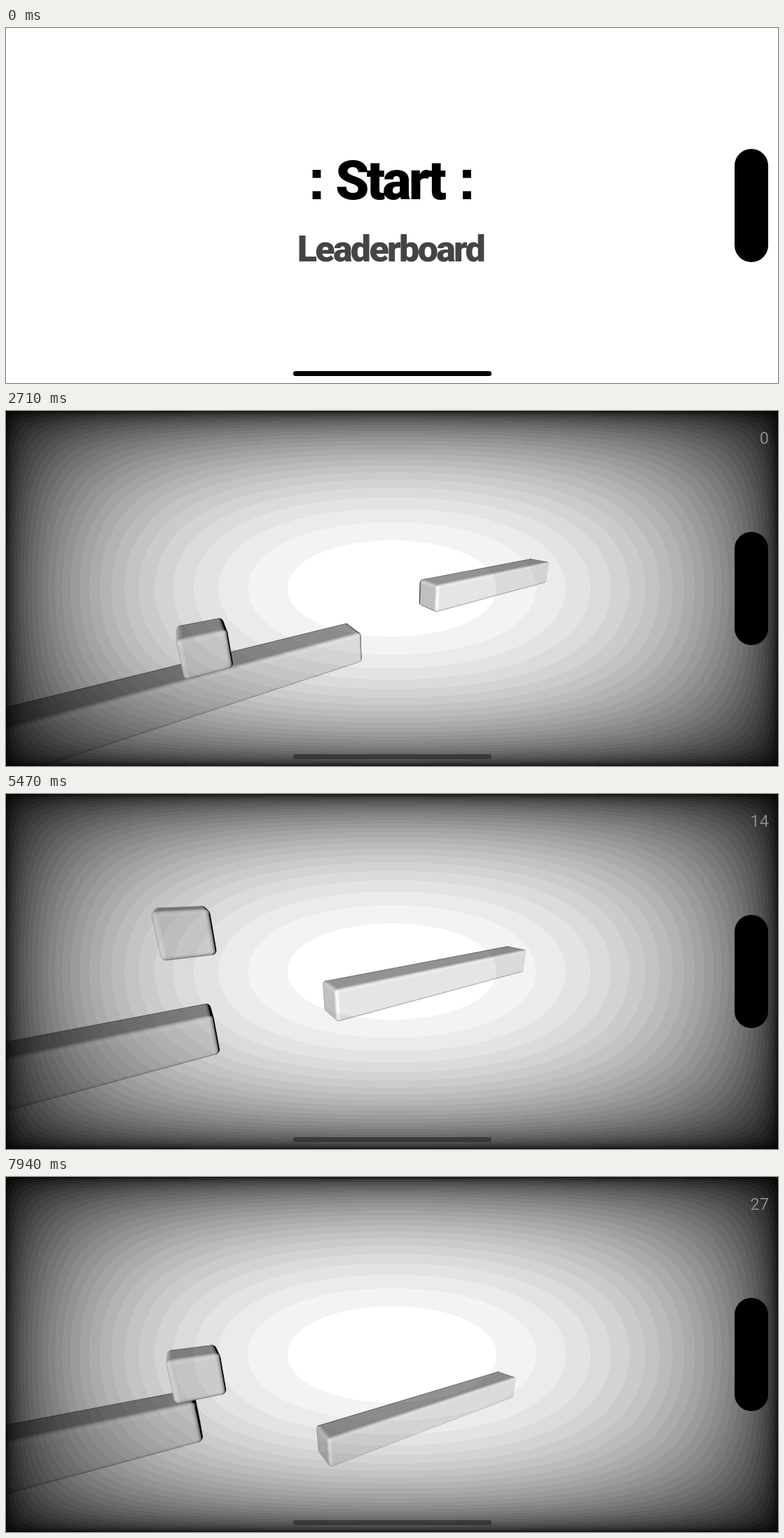
Recreate the animation shown at these times as an HTML page with a canvas. Size 1102 by 508 pixels, loop 8 s.

```html
<!DOCTYPE html>
<html lang="en">
<head>
<meta charset="utf-8">
<title>Cube runner</title>
<style>
  html, body { margin: 0; width: 1102px; height: 508px; overflow: hidden; background: #fff; }
  body { position: relative; }
  svg, canvas, #dim, #game, #pill, #bar { position: absolute; left: 0; top: 0; }
  svg, canvas, #dim, #game { width: 1102px; height: 508px; }
  svg text { font-family: Roboto, "Liberation Sans", sans-serif; font-weight: 900; text-anchor: middle; }
  .colon { font: bold 84px "Liberation Sans", Arial, sans-serif; letter-spacing: 0; }
  #dim { background: #000; }
  #game { overflow: hidden; background: #fff; }
  #game.sliding {
    clip-path: path("M0,100 C0,22 22,0 100,0 H1002 C1080,0 1102,22 1102,100 V408 C1102,486 1080,508 1002,508 H100 C22,508 0,486 0,408 Z");
  }
  #score { position: absolute; right: 13px; top: 25px; color: #888; font: 23.5px/28px Roboto, Inter, sans-serif; }
  #pill { left: 1040px; top: 173px; width: 47.5px; height: 162px; border-radius: 24px; background: #000; }
  #bar { left: 410px; top: 491px; width: 283px; height: 6.5px; border-radius: 3.3px; background: #000; }
</style>
</head>
<body>
<svg viewBox="0 0 1102 508">
  <text id="start" y="245" font-size="77" letter-spacing="-3.6"><tspan class="colon" x="443.5">:</tspan><tspan x="547.7">Start</tspan><tspan class="colon" x="658">:</tspan></text>
  <text x="549" y="334" font-size="52" letter-spacing="-2.7" fill="#444">Leaderboard</text>
</svg>
<div id="dim"></div>
<div id="game">
  <canvas id="scene" width="1102" height="508"></canvas>
  <canvas id="vignette" width="1102" height="508"></canvas>
  <div id="score">0</div>
</div>
<div id="pill"></div>
<div id="bar"></div>
<script>
const W = 1102, H = 508, LOOP = 8000;
const FOCAL = 440, CAM_Y = 4.03, CAM_Z = 8.1, ROUND = 0.1;
const SLIDE = 530, LIVE = 1050, RUN = 2514, SPEED = 5;
const JUMP = 6.7, GRAVITY = 9.8;
// left, right, level of the top, distance at which it appears
const platforms = [[-5, 5, 0, -1], [8, 15, 1, 0], [18, 27, 1, 10], [30, 39, -1, 22]];
// start time, level jumped from
const jumps = [[3433, 0], [5215, 1], [7935, 1]];

const $ = id => document.getElementById(id);
const clamp = v => Math.min(1, Math.max(0, v));
const ctx = $("scene").getContext("2d");
ctx.lineWidth = 0.5;
let sinYaw, cosYaw, sinPitch, cosPitch, light;

function paintVignette() {
  const g = $("vignette").getContext("2d"), img = g.createImageData(W, H);
  const falloff = (i, n) => 1 - (2 * (i + 0.5) / n - 1) ** 2;
  for (let y = 0, k = 3; y < H; y++)
    for (let x = 0; x < W; x++, k += 4) {
      const b = 255 * (falloff(x, W) * falloff(y, H)) ** 0.445;
      const band = Math.floor((b + 1.5) / 8);
      img.data[k] = band > 30 ? 0 : 252 - 8 * band;
    }
  g.putImageData(img, 0, 0);
}

function aim(q) {
  const yaw = q * 34 * Math.PI / 180, pitch = q * 17 * Math.PI / 180;
  sinYaw = Math.sin(yaw); cosYaw = Math.cos(yaw);
  sinPitch = Math.sin(pitch); cosPitch = Math.cos(pitch);
  light = [-sinYaw * cosPitch, sinPitch, cosYaw * cosPitch];
}

function project([x, y, z]) {
  const h = y - CAM_Y, d = CAM_Z - z;
  const u = x * cosYaw - d * sinYaw, w = x * sinYaw + d * cosYaw;
  const v = h * cosPitch + w * sinPitch, depth = w * cosPitch - h * sinPitch;
  return [W / 2 + FOCAL * u / depth, H / 2 - FOCAL * v / depth];
}

const dot = (a, b) => a[0] * b[0] + a[1] * b[1] + a[2] * b[2];

function face(points) {
  const n = [0, 1, 2].map(i => points.reduce((s, p) => s + p.n[i], 0));
  const [x, y, z] = points[0].at;
  if (dot(n, [-x, CAM_Y - y, CAM_Z - z]) <= 0) return;
  const lit = Math.max(0, dot(n, light)) / Math.hypot(...n);
  const c = Math.round(255 * lit ** (1 / 2.2));
  ctx.fillStyle = ctx.strokeStyle = `rgb(${c},${c},${c})`;
  ctx.beginPath();
  for (const p of points) ctx.lineTo(...project(p.at));
  ctx.closePath();
  ctx.fill();
  ctx.stroke();
}

// Box one unit high and deep with rounded edges; convex, so culling replaces sorting.
function box(left, right, bottom) {
  const N = 4, rows = [];
  const mid = [(left + right) / 2, bottom + 0.5, 0];
  const core = [(right - left) / 2 - ROUND, 0.5 - ROUND, 0.5 - ROUND];
  for (const sy of [-1, 1])
    for (let j = 0; j <= N; j++) {
      const lat = (sy < 0 ? j / N - 1 : j / N) * Math.PI / 2, row = [];
      for (let k = 0; k < 4; k++)
        for (let i = 0; i <= N; i++) {
          const lon = (k + i / N) * Math.PI / 2;
          const sign = [k % 3 ? -1 : 1, sy, k < 2 ? 1 : -1];
          const n = [Math.cos(lat) * Math.cos(lon), Math.sin(lat), Math.cos(lat) * Math.sin(lon)];
          row.push({ n, at: n.map((c, a) => mid[a] + sign[a] * core[a] + ROUND * c) });
        }
      rows.push(row);
    }
  face(rows[0]);
  face(rows[rows.length - 1]);
  for (let j = 1; j < rows.length; j++)
    rows[j].forEach((p, i) => {
      const next = (i + 1) % rows[j].length;
      face([rows[j - 1][i], rows[j - 1][next], rows[j][next], p]);
    });
}

function cubeHeight(t) {
  if (t < LIVE) return 1;
  let h = 0;
  for (const [start, from] of jumps) {
    const s = (t - start) / 1000;
    if (s < 0) break;
    const arc = from + JUMP * s - GRAVITY / 2 * s * s;
    h = s > 0.7 ? Math.max(1, arc) : arc;
  }
  return h;
}

function drawScene(t) {
  const run = Math.max(0, (t - RUN) / 1000 * SPEED);
  // The view holds still while it slides in, though its camera move is already under way.
  aim(t < LIVE ? 0 : clamp((t - 560) / 2000));
  ctx.clearRect(0, 0, W, H);
  for (const [left, right, level, from] of platforms) {
    const visible = from < 0 || (t >= RUN && run >= from);
    if (visible && right - run > -5) box(Math.max(left - run, -6), right - run, level - 1);
  }
  box(-0.5, 0.5, cubeHeight(t));
  $("score").textContent = Math.floor(run);
}

function frame() {
  const t = performance.now() % LOOP;
  const s = Math.max(0, t - SLIDE) * 0.018;
  const gap = t < LIVE ? (1 + s) * Math.exp(-s) : 0;
  const game = $("game");
  game.className = t < LIVE ? "sliding" : "";
  game.style.visibility = t < SLIDE ? "hidden" : "visible";
  game.style.transform = `translateY(${H * gap}px)`;
  $("dim").style.opacity = 0.2 * (1 - gap);
  $("start").style.opacity = t < 290 ? 1 : 0.35 + 0.65 * clamp((t - SLIDE) / 250);
  $("bar").style.opacity = 1 - 0.62 * clamp((t - 600) / 350);
  if (t >= SLIDE) drawScene(t);
  requestAnimationFrame(frame);
}

paintVignette();
frame();
</script>
</body>
</html>
```
